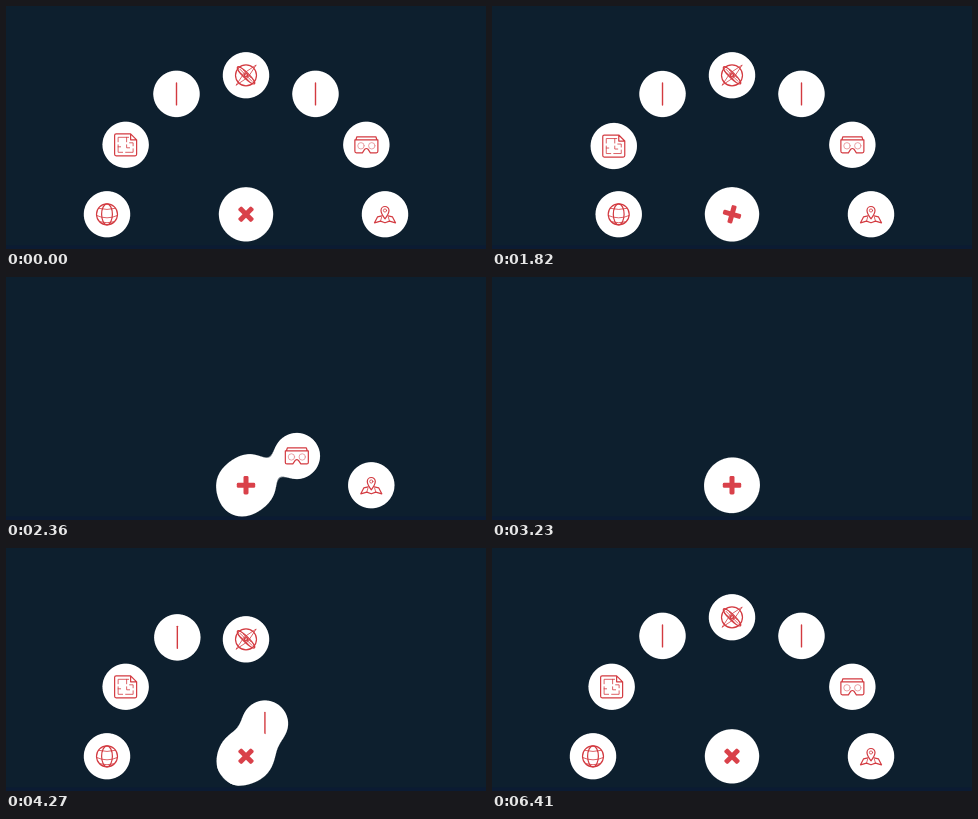
An HTML page for the animation above (6460 ms loop, 480x243 px).

```html
<!DOCTYPE html>
<html lang="en">
<head>
<meta charset="utf-8">
<title>Gooey radial menu</title>
<style>
  html, body { margin: 0; height: 100%; overflow: hidden; background: #0d1f2e; }
  svg { display: block; width: 100vw; height: 100vh; }
  .disc { fill: #fff; }
  .icon { fill: none; stroke: #d33a40; stroke-width: 1.2; stroke-linejoin: round; stroke-linecap: round; }
  .thin { stroke-width: .8; }
  .soft { stroke-width: .8; stroke: #e58a8e; }
  .solid { fill: #d9414a; }
</style>
</head>
<body>
<svg viewBox="0 0 480 243">
  <defs>
    <filter id="goo" filterUnits="userSpaceOnUse" x="0" y="0" width="480" height="243" color-interpolation-filters="sRGB">
      <feGaussianBlur in="SourceGraphic" stdDeviation="7.6"/>
      <feColorMatrix values="0 0 0 0 1  0 0 0 0 1  0 0 0 0 1  0 0 0 18 -7" result="goo"/>
      <feComposite in="SourceGraphic" in2="goo"/>
    </filter>
  </defs>
  <rect width="480" height="243" fill="#0d1f2e"/>
  <rect y="239.5" width="480" height="3.5" fill="#0b1b33"/>
  <g filter="url(#goo)">
    <g id="items"></g>
    <g transform="translate(240 208.3)">
      <circle class="disc" r="26.6"/>
      <g id="toggle" class="solid">
        <rect x="-9.2" y="-2.5" width="18.4" height="5" rx="1.4"/>
        <rect x="-2.5" y="-9.2" width="5" height="18.4" rx="1.4"/>
      </g>
    </g>
  </g>
</svg>
<script>
const LOOP = 6460, CLOSE_AT = 1567, OPEN_AT = 3628;
const STAGGER = 95, SQUASH = 237, STRETCH = 178, SETTLE = 3562;
const DIST = 139, CX = 240, CY = 208.3, BIG = 26.6, SMALL = 22.8;

const divider = '<path d="M0-11V11" stroke-width="1.4"/>';
const icons = [
  // globe
  `<circle r="10.5"/><ellipse rx="5.4" ry="10.5"/>
   <path class="thin" d="M-8.6-6Q0-3.6 8.6-6M-10.4 1.2Q0 6 10.4 1.2M-7.4 7.4Q0 9.6 7.4 7.4"/>`,
  // floor plan
  `<path d="M5-11H-9.5Q-11-11-11-9.5V9.5Q-11 11-9.5 11H9.5Q11 11 11 9.5V-5ZV-5H11"/>
   <path class="thin" d="M3-7.5H-7.5V-3M-7.5 0V7.5H-3M0 7.5H7.5V4M7.5 1V-2H4M-7.5 2H-5M1-7.5V-3M1 0V3H4"/>`,
  divider,
  // compass
  `<circle r="10.5"/><ellipse rx="12" ry="2.8" transform="rotate(45)"/>
   <path class="thin" d="M10-10L2 2L-10 10L-2-2Z"/>
   <path class="thin" d="M-6-6L6 6M-5-2.5L2.5 5M-2.5-5L5 2.5"/><circle r="1.6"/>`,
  divider,
  // cardboard viewer
  `<path d="M-10.5-5L-9.5-8H9.5L10.5-5M-11.5-5H11.5V6.5Q11.5 8 10 8H4L1.6 4.4Q0 3-1.6 4.4L-4 8H-10Q-11.5 8-11.5 6.5Z"/>
   <circle class="soft" cx="-5.4" cy="1" r="3.2"/><circle class="soft" cx="5.4" cy="1" r="3.2"/>`,
  // map pin
  `<path d="M0 4.5Q-4-.8-4-3.8A4 4 0 0 1 4-3.8Q4-.8 0 4.5Z"/><circle class="thin" cy="-3.8" r="1.6"/>
   <path d="M-3 1.5L-7.5 2.6L-10.5 8.5L-4.5 6.8L0 8.5L4.5 6.8L10.5 8.5L7.5 2.6L3 1.5"/>
   <path class="thin" d="M-4.5 6.8L-3.4 3M4.5 6.8L3.4 3"/>`
];

const clamp = x => Math.min(1, Math.max(0, x));
const mix = (a, b, k) => a + (b - a) * k;
const inOut = n => x => x < .5 ? (2 * x) ** n / 2 : 1 - (2 - 2 * x) ** n / 2;
const quad = inOut(2), quint = inOut(5);
const PERIOD = .12, SHIFT = PERIOD / (2 * Math.PI) * Math.asin(1 / 1.1);
const elastic = x => x <= 0 ? 0 :
  1 + 1.1 * 2 ** (-10 * x) * Math.sin((x - SHIFT) * 2 * Math.PI / PERIOD);

// [start, squash, stretch, rest] scale along the spoke; [start, end] across it
const OPENING = { along: [1, 1.2, .7, .8], across: [1, .8] };
const CLOSING = { along: [.8, .8, 1.2, 1], across: [.8, 1] };

function bounce({ along, across }, age) {
  const first = quad(clamp(age / SQUASH));
  const second = quad(clamp((age - SQUASH) / STRETCH));
  const last = elastic(clamp((age - SQUASH - STRETCH) / SETTLE));
  const spoke = mix(mix(mix(along[0], along[1], first), along[2], second), along[3], last);
  return [spoke, mix(...across, first)];
}

const holder = document.getElementById('items');
const toggle = document.getElementById('toggle');
holder.innerHTML = icons.map(icon =>
  `<g><ellipse class="disc"/><g><circle class="disc" r="${SMALL}"/><g class="icon">${icon}</g></g></g>`).join('');
const items = [...holder.children].map((g, i) => {
  const [blob, button] = g.children, deg = 180 + 30 * i;
  blob.setAttribute('transform', `translate(${CX} ${CY}) rotate(${deg})`);
  return { blob, button, a: deg * Math.PI / 180 };
});

function draw(now) {
  const t = now % LOOP;
  const closing = t >= CLOSE_AT && t < OPEN_AT;
  const age = closing ? t - CLOSE_AT : (t - OPEN_AT + LOOP) % LOOP;
  items.forEach(({ blob, button, a }, i) => {
    const e = age - i * STAGGER;
    const d = DIST * (closing ? 1 - clamp(e / 356) ** 5 : quint(clamp(e / 594)));
    const [along, across] = bounce(closing ? CLOSING : OPENING, e);
    blob.setAttribute('rx', BIG * along);
    blob.setAttribute('ry', BIG * across);
    button.setAttribute('transform', `translate(${CX + d * Math.cos(a)} ${CY + d * Math.sin(a)})`);
  });
  const turn = quint(clamp(age / 475));
  toggle.setAttribute('transform', `rotate(${45 * (closing ? 1 - turn : turn)})`);
}

const start = performance.now();
function frame() {
  draw(performance.now() - start);
  requestAnimationFrame(frame);
}
frame();
</script>
</body>
</html>
```
